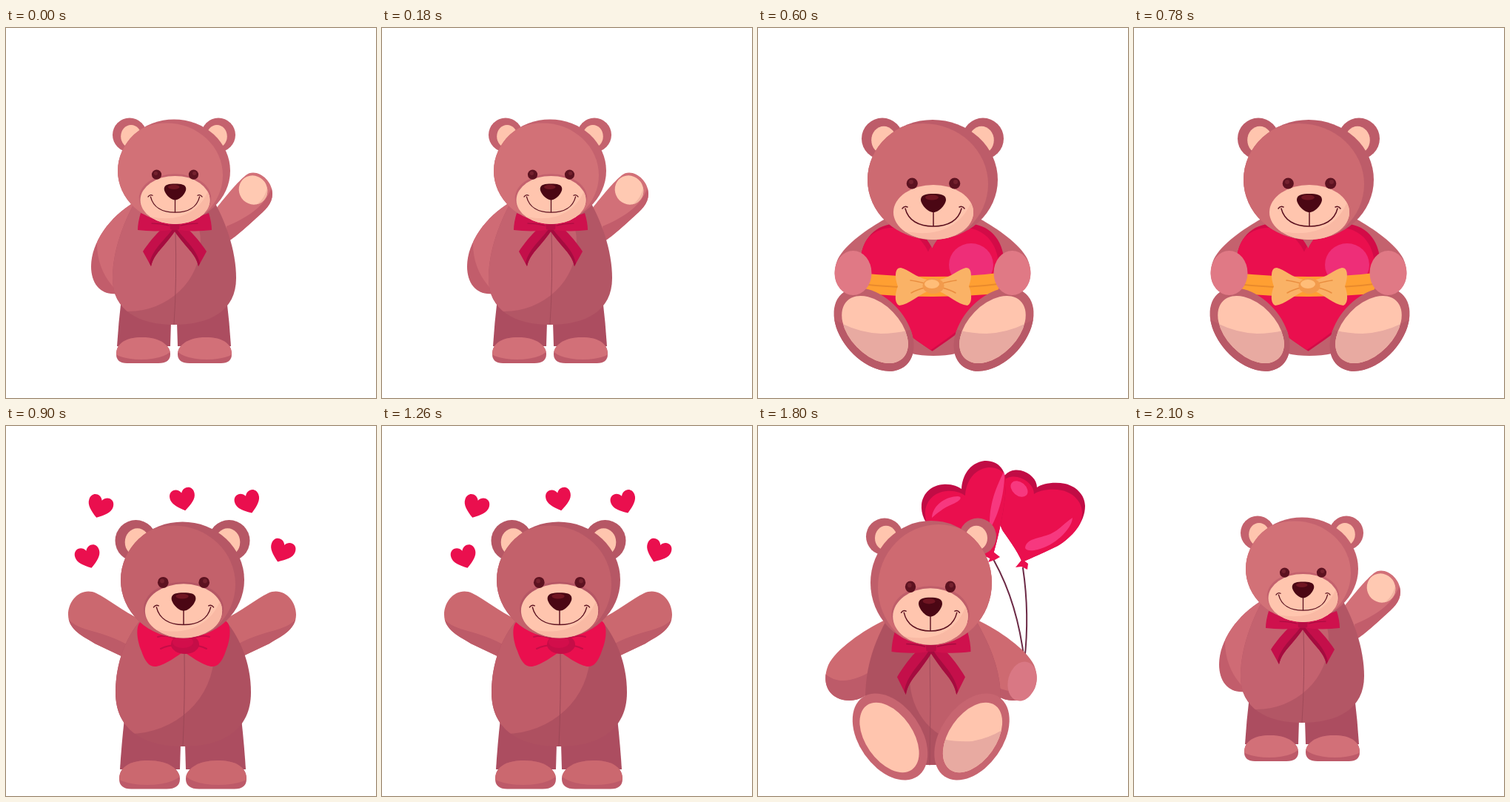
An HTML page that plays this animation: 500 by 500 pixels, repeating every 2.4 s.

```html
<!DOCTYPE html>
<html lang="en">
<head>
<meta charset="utf-8">
<title>Teddy bear</title>
<style>
html, body { margin: 0; width: 100%; height: 100%; overflow: hidden; background: #fff }
svg { display: block; width: 100vw; height: 100vh }
</style>
</head>
<body>
<svg id="stage" viewBox="0 0 500 500"></svg>
<script>
const RED = '#ea0f4e', DARK_RED = '#c10c45', PEACH = '#ffc5ae', PAD_SHADE = '#e8aaa1';
let clips = 0;

const path = (d, fill, transform = '') => `<path d="${d}" fill="${fill}" transform="${transform}"/>`;
const line = (d, color, width) =>
  `<path d="${d}" fill="none" stroke="${color}" stroke-width="${width}" stroke-linecap="round"/>`;
const oval = (x, y, rx, ry, fill, turn = 0) =>
  `<ellipse cx="${x}" cy="${y}" rx="${rx}" ry="${ry}" fill="${fill}" transform="rotate(${turn} ${x} ${y})"/>`;
const move = (x, y, s, sx = 1, sy = sx, turn = 0) =>
  `<g transform="translate(${x} ${y}) rotate(${turn}) scale(${sx} ${sy})">${s}</g>`;
const flip = (cx, s) => move(2 * cx, 0, s, -1, 1);
const both = (cx, s) => s + flip(cx, s);

// One basic shape with shading drawn only inside its outline
function shaded(shape, shade) {
  const id = 'c' + clips++;
  return `<clipPath id="${id}">${shape}</clipPath>${shape}<g clip-path="url(#${id})">${shade}</g>`;
}

const HEART = 'M0 16C-10 9 -17 3 -17 -5C-17 -17 -4 -18 0 -9C4 -18 17 -17 17 -5C17 3 10 9 0 16Z';

function face(x, y, sx, sy, rim) {
  const eyes = both(0, oval(-28.7, -26, 7.6, 7.6, '#5c1220') + oval(-30, -28, 3, 3, '#74212e'));
  return move(x, y,
    (rim ? oval(0, 10, 56, 37, rim) : '') +
    shaded(oval(0, 13, 54, 37, PEACH), path('M54 -10C42 35 0 48 -40 38L0 60L70 50Z', '#f9b9a4')) + eyes +
    line('M0 10V32M-38 8C-34 24 -20 32 0 32C20 32 34 24 38 8M-42 8Q-39 4 -35 6M42 8Q39 4 35 6', '#5c1220', 1.5) +
    path('M-17 -4C-17 -11 -9 -12 0 -12C9 -12 17 -11 17 -4C17 2 8 13 0 13C-8 13 -17 2 -17 -4Z', '#4b0714') +
    oval(-2, -7, 9, 3.5, '#701522'), sx, sy);
}

function head(cx, cy, rx, ry, ear, light, dark, shift) {
  const [dx, y, r] = ear;
  return both(cx, oval(cx - dx, y, r, r, dark) + oval(cx - dx + 2, y + 2, r * .6, r * .67, PEACH)) +
    shaded(oval(cx, cy, rx, ry, dark), oval(cx + shift, cy + 6, rx, ry + 1, light));
}

const ribbonBow = (x, y, sx, sy) => move(x, y,
  both(0, path('M-16 3C-26 12 -36 24 -43 35L-32 55C-30 46 -26 40 -20 33C-12 24 -4 14 2 5Z', '#c40f4a') +
    path('M-32 55C-30 46 -26 40 -20 33C-12 24 -4 14 2 5L-3 5C-14 20 -30 32 -34 51Z', '#a50c3f')) +
  both(0, path('M0 -4C-16 -7 -34 -12 -46 -17Q-50 -4 -50 6C-33 8 -14 8 0 5Z', '#cf114d') +
    line('M-8 0Q-20 -3 -31 -3', '#a50c3f', 1.2)) +
  path('M-7 -4Q0 -6 7 -4L6 5Q0 7 -6 5Z', '#b80e45'), sx, sy);

// Left leg with its foot; w and h are the foot's size
const leg = (x, y, w, h, top, tone) =>
  path(`M${x + 7} ${top}Q${x + 3} ${y - 20} ${x + 1} ${y + 12}H${x + w}L${x + w + 2} ${top}Z`, '#ac4d60') +
  shaded(path(`M${x} ${y + h * .65}C${x} ${y + h * .2} ${x + w * .2} ${y} ${x + w * .48} ${y}` +
    `C${x + w * .8} ${y} ${x + w} ${y + h * .3} ${x + w} ${y + h * .65}Q${x + w} ${y + h} ${x + w * .78} ${y + h}` +
    `H${x + w * .2}Q${x} ${y + h} ${x} ${y + h * .65}Z`, '#bd5a69'),
    oval(x + w * .46, y + h * .38, w * .58, h * .48, tone));

function wave() {
  const arm = path('M284 244C298 226 314 207 324 199C337 188 360 204 360 224C360 238 350 246 338 257C326 268 314 279 301 288Z', '#d27078');
  const body = path('M180 225C160 258 144 300 144 338C144 382 180 401 227 401C276 401 311 382 311 338C311 300 296 258 276 225Z', '#b35665');
  return shaded(arm, path('M360 212C352 242 322 258 298 268L300 300L370 260Z', '#c25d6b')) +
    shaded(oval(334, 219, 19, 20, '#ffc9b2', -35), path('M354 210Q351 232 336 240L360 245Z', '#f2b6a3')) +
    shaded(path('M174 235C140 255 115 290 115 322C115 346 128 361 149 359L170 330Z', '#c25d6b'),
      oval(190, 292, 67, 78, '#cf6b75')) +
    both(227, leg(149, 418, 73, 35, 365, '#d27078')) +
    shaded(body, oval(165, 290, 98, 93, '#c4626f')) +
    line('M229 275Q231 340 227 400', '#a04a59', 1) +
    ribbonBow(228, 267, 1, 1) +
    head(227, 193, 76, 69.5, [60, 144.5, 23], '#d27177', '#c4626e', -10) +
    face(228.5, 221, .87, .88, '#c4626e');
}

// A balloon whose upper edge, left bare by the shift, stays dark
const balloon = (d, dx, dy, gloss) =>
  shaded(path(d, DARK_RED), path(d, RED, `translate(${dx} ${dy})`) + gloss);

function balloons() {
  const GLOSS = '#f7387f';
  const right = balloon('M357 184C350 168 338 152 331 142C322 125 322 98 328 78C333 60 346 58 355 60C368 63 377 73 377 83' +
    'C383 78 400 75 415 78C432 82 442 95 442 108C442 130 425 150 405 162C385 172 370 178 357 184Z', -4, 9,
    oval(353, 85, 13, 9, GLOSS, 40) +
    path('M361 165C362 152 380 152 395 146C408 140 415 130 425 124C424 140 400 162 378 167C370 169 363 169 361 165Z', GLOSS));
  const left = balloon('M316 180C300 172 260 160 240 145C225 133 220 118 221 106C223 90 235 80 250 79C262 78 270 82 275 85' +
    'C276 68 285 50 306 47C325 46 336 60 335 80C334 110 325 150 316 180Z', 5, 9,
    path('M235 124C236 106 255 95 270 95C278 96 272 102 262 106C250 111 242 118 235 124Z', GLOSS) +
    path('M333 60C318 90 312 110 313 140C325 120 334 90 333 60Z', GLOSS));
  const arm = path('M172 262C142 276 105 302 95 323C84 350 98 371 124 371C138 371 150 362 158 354L190 330Z', '#ce6a71');
  const body = path('M172 265C154 300 145 330 145 370C145 430 170 458 234 458C300 458 328 430 328 370C328 330 315 300 296 265Z', '#ae5160');
  const foot = oval(178.5, 420, 65, 42, '#c76570', 55);
  const pad = oval(177.5, 421, 53, 32, PEACH, 55);
  const shade = path('M120 398Q145 420 178 426Q200 427 218 423V490H120Z', PAD_SHADE);
  return right + left +
    path('M318 170L311 184L320 181L327 177Z', RED) + path('M357 180L348 191L356 190L364 194L365 186Z', RED) +
    line('M319 182C340 220 354 266 360 318', '#6c2a46', 2) + line('M358 192C364 232 365 274 360 318', '#6c2a46', 2) +
    shaded(arm, path('M90 334C108 351 132 345 162 326V380H90Z', '#bd5b69')) +
    flip(234, shaded(arm, path('M88 350C118 367 143 357 168 340V390H88Z', '#bd5b69'))) +
    oval(357, 345, 19, 27, '#d97884', 15) +
    shaded(body, oval(281, 340, 76, 87, '#bf5e6a')) +
    line('M232 300Q234 380 232 458', '#a04b5a', 1) +
    foot + pad + flip(233.75, foot + shaded(pad, shade)) +
    ribbonBow(234, 298, 1.07, 1.18) +
    head(234, 212, 82, 84, [63, 149.5, 25], '#ce6a71', '#bf5e6a', 10) +
    face(233, 244, .94, 1.03, '#bf5e6a');
}

function gift() {
  const arm = path('M172 258C150 270 118 292 108 312C98 335 106 357 128 361L180 350L190 270Z', '#c4626e');
  const foot = oval(156.5, 407.5, 65, 43, '#bf5f6b', 48);
  const pad = oval(158, 407.5, 54, 34, PEACH, 46);
  const low = fill => path('M95 389Q130 412 166 413Q192 413 215 405V470H95Z', fill);
  const heart = path(HEART, '#d30b47', 'translate(235.5 348) scale(5.72 5.55)');
  const wing = path('M228 340C214 337 203 326 193 324C184 324 185 338 189 349C185 359 184 372 191 375C204 374 216 361 229 356Z', '#fab266') +
    line('M225 345Q214 342 206 341M225 351Q214 354 207 358', '#e98d3f', 1.5);
  return path('M172 260C145 310 145 400 180 430Q205 443 237 443Q270 443 296 430C328 400 328 310 302 260Z', '#c0606d') +
    both(236, arm) +
    shaded(heart, path(HEART, RED, 'translate(230 351) scale(5.6 5.4)') + oval(288, 320, 30, 29, '#ee2e78') +
      path('M130 330Q180 336 236 336Q292 336 340 329V357Q292 363 236 363Q180 363 130 357Z', '#ff9f32') +
      line('M130 345Q180 351 236 351Q292 351 340 344', '#e98a2c', 2)) +
    both(237, wing) + oval(237, 348.5, 14.5, 10.5, '#f29b4c') + oval(235, 346, 10, 6, '#ffbd78') +
    both(237.5, shaded(foot, low('#b85967')) + shaded(pad, low(PAD_SHADE))) +
    both(236, oval(128.5, 331, 25, 30, '#e07985')) +
    head(236, 205, 88, 81, [68, 149.5, 28], '#cd6a71', '#bd5c69', -13) + face(237, 236, 1, 1);
}

function hug() {
  const arm = path('M182 262C158 250 138 234 122 226C102 217 84 235 84 255C84 276 106 285 120 294L158 312L185 300Z', '#cb686f');
  const body = path('M188 255C162 283 148 320 148 360C148 410 185 433 239 433C294 433 331 410 331 360C331 320 316 283 290 255Z', '#ae5060');
  const wing = path('M240 287C222 279 204 267 187 263C175 262 175 285 183 304C188 319 194 326 203 325C218 322 231 310 242 304Z', RED) +
    line('M232 289Q217 281 205 285M232 296Q219 296 209 301', '#c50d47', 2);
  const hearts = [[127, 109, 18], [239, 99, -12], [327, 103, -20], [373, 169, 22], [111, 177, -17]];
  return hearts.map(([x, y, turn]) => move(x, y, path(HEART, RED), 1, .97, turn)).join('') +
    both(238, shaded(arm, path('M80 254C92 280 125 272 168 298V330H80Z', '#bd5b68'))) +
    both(239, leg(153, 452, 82, 38.5, 395, '#cb686f')) +
    shaded(body, oval(166, 308, 115, 108, '#bf5d69')) +
    line('M241 305Q242 370 239 432', '#9c4756', 1) +
    both(240, wing) + oval(242, 295, 19, 13, '#c50d47') + oval(239, 292, 14, 8, '#d20e4b') +
    head(238.5, 208, 83.5, 78.5, [63, 155, 28], '#c3616b', '#b65765', -12) +
    face(240, 237, .965, .985, '#b65765');
}

const poses = [wave, balloons, gift, hug].map(draw => draw());
const order = [0, 1, 2, 3, 3, 2, 1, 0], STEP = 300;
const stage = document.getElementById('stage');
let shown = -1;

function tick() {
  const pose = order[Math.floor(performance.now() / STEP) % order.length];
  if (pose !== shown) stage.innerHTML = poses[shown = pose];
  requestAnimationFrame(tick);
}
tick();
</script>
</body>
</html>
```
